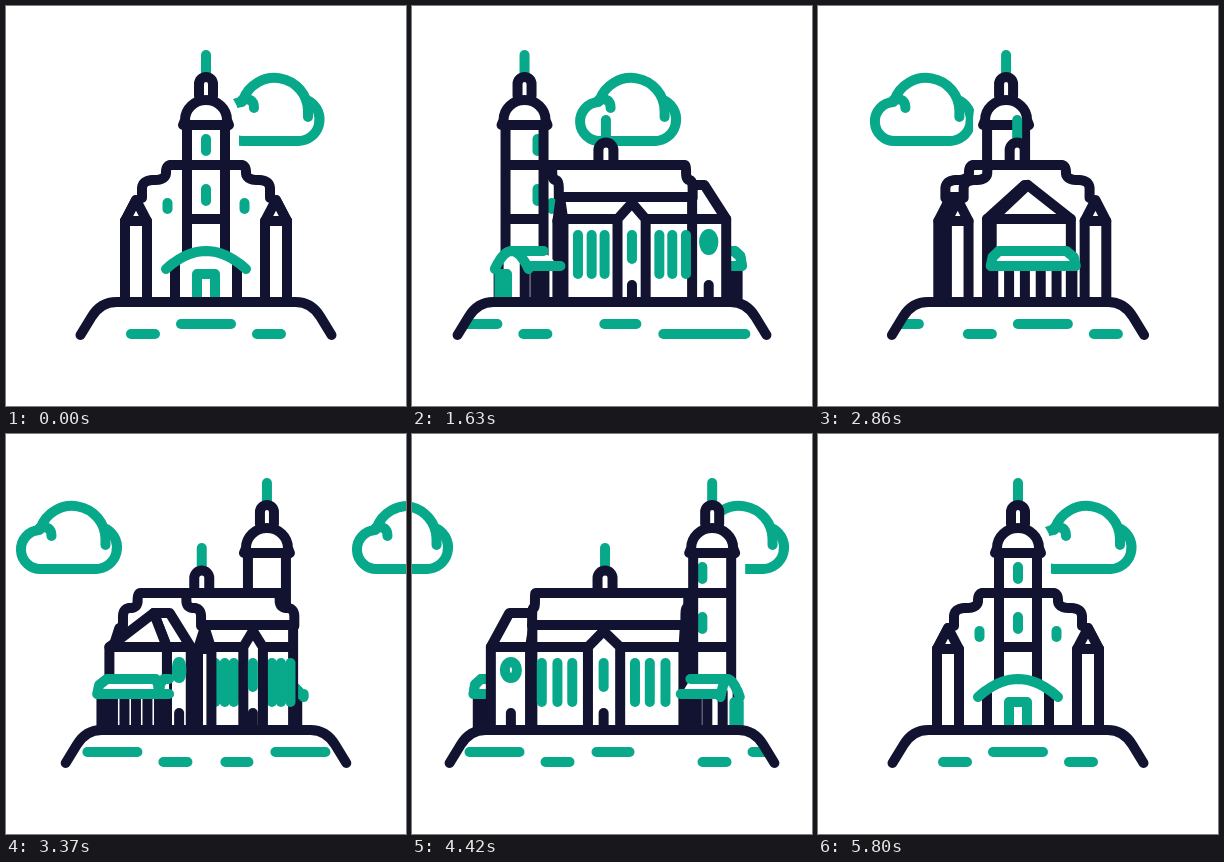
These frames come from a looping animation (400x400 px, 5860 ms). An HTML page with a canvas:

```html
<!DOCTYPE html>
<html lang="en">
<head>
<meta charset="utf-8">
<title>Turning church</title>
<style>
html, body { margin: 0; width: 100%; height: 100%; overflow: hidden; background: #fff; }
canvas { display: block; width: 100vmin; height: 100vmin; margin: 0 auto; }
</style>
</head>
<body>
<canvas id="stage"></canvas>
<script>
const NAVY = '#121331', TEAL = '#08a88a', WHITE = '#fff';
const LOOP = 5860, HOLD = 1030, STEP = 30;
const FRONT = 93, BACK = -83, TOWER = 115, GROUND = 296;

const canvas = document.getElementById('stage');
const ctx = canvas.getContext('2d');
const ratio = Math.max(1, window.devicePixelRatio || 1);
canvas.width = canvas.height = 400 * ratio;

// Elapsed ms and share of the full turn.
const turn = [[0, 0], [630, .147], [1140, .303], [1860, .478], [2400, .61],
  [2910, .7325], [3600, .857], [3900, .909], [4200, .9435], [4800, 1]];
const rates = turn.slice(1).map((k, i) => (k[1] - turn[i][1]) / (k[0] - turn[i][0]));
const slopes = turn.map((k, i) => i && i < rates.length
  ? 2 * rates[i - 1] * rates[i] / (rates[i - 1] + rates[i]) : 0);

function progress(ms) {
  if (ms >= 4800) return 1;
  let i = 0;
  while (ms > turn[i + 1][0]) i++;
  const [t0, a] = turn[i], [t1, b] = turn[i + 1];
  const h = t1 - t0, u = (ms - t0) / h, v = 1 - u;
  return a * v * v * (1 + 2 * u) + b * u * u * (3 - 2 * u)
    + h * u * v * (slopes[i] * v - slopes[i + 1] * u);
}

let sin = 0, cos = 1, wide = 1, slim = 1, side = 1;

// The building lingers slightly at its front and back views.
function aim(p) {
  const even = p * 2 * Math.PI;
  const a = even - .076 * Math.sin(2 * even) - .026 * Math.sin(4 * even);
  sin = Math.sin(a);
  cos = Math.cos(a);
  if (Math.abs(sin) < 1e-6) sin = 0;
  slim = Math.abs(cos);
  wide = cos * slim;
  side = sin >= 0 ? 1 : -1;
}

const X = (x, z) => 200 + x * wide - z * sin;

// Points are [x, z, y] in the building's own space.
function shape(pts, stroke = NAVY, fill, closed) {
  ctx.beginPath();
  pts.forEach(([x, z, y]) => ctx.lineTo(X(x, z), y));
  if (closed) ctx.closePath();
  paint(stroke, fill);
}

function paint(stroke, fill, path) {
  if (fill) {
    ctx.fillStyle = fill;
    path ? ctx.fill(path) : ctx.fill();
  }
  if (stroke) {
    ctx.strokeStyle = stroke;
    path ? ctx.stroke(path) : ctx.stroke();
  }
}

function flat(d, stroke, fill) {
  paint(stroke, fill, new Path2D(d));
}

const post = (x, z, top, bottom, color) => shape([[x, z, top], [x, z, bottom]], color);
const beam = (x, z0, z1, y, color) => shape([[x, z0, y], [x, z1, y]], color);

const cloudParts = [
  'M292 135H238A19.5 19.5 0 0 1 236 96',
  'M236 94Q248 91 248 102',
  'M237 94A33.5 33.5 0 0 1 302 105V111',
  'M303 95A21.5 21.5 0 0 1 292 135'
].map(d => new Path2D(d));

function clouds(p) {
  for (const shift of p < .5 ? [0] : [0, 336]) {
    ctx.save();
    ctx.translate(shift - 336 * p, 0);
    cloudParts.forEach(c => paint(TEAL, null, c));
    ctx.restore();
  }
  const x = X(0, TOWER);
  flat(`M${x - 33} 158V112A33 33 0 0 1 ${x + 33} 112V158Z`, null, WHITE);
}

const dashes = [
  [318, [[19, 52], [175, 225], [332, 364], [499, 555], [654, 704], [842, 892]]],
  [328, [[125, 149], [251, 275], [391, 473], [604, 628], [730, 754], [792, 815], [918, 942]]]
];

function hill(p) {
  const half = Math.hypot(125.5 * cos, 172.5 * sin);
  const l = 200 - half, r = 200 + half;
  const d = `M${l} 329L${l + 11} 311Q${l + 20} 296 ${l + 36} 296H${r - 36}`
    + `Q${r - 20} 296 ${r - 11} 311L${r} 329`;
  ctx.save();
  ctx.clip(new Path2D(d + `V334H${l}Z`));
  for (const [y, row] of dashes)
    for (const [a, b] of row)
      for (const lap of [0, 950]) {
        const x = a + lap - 950 * p;
        flat(`M${x} ${y}h${b - a}`, TEAL);
      }
  ctx.restore();
  flat(d, NAVY);
}

function tower() {
  const x = X(0, TOWER);
  flat(`M${x - 19.5} 119V296H${x + 19.5}V119Z`, null, WHITE);
  const faces = [[-20 * sin, cos], [20 * cos, sin], [-20 * cos, -sin]];
  for (const [dx, facing] of faces)
    if (facing > .7) flat(`M${x + dx} 133V145M${x + dx} 183V195`, TEAL);
  flat(`M${x - 19} 119V296M${x + 19} 119V296M${x - 19} 159H${x + 19}M${x - 19} 213H${x + 19}`, NAVY);
  flat(`M${x} 49V68`, TEAL);
  flat(`M${x - 7} 90V78A7 7 0 0 1 ${x + 7} 78V90`, NAVY, WHITE);
  flat(`M${x - 23} 119L${x - 21} 114A21 20 0 0 1 ${x + 21} 114L${x + 23} 119Z`, NAVY, WHITE);
}

function turret() {
  const x = 200 - 8 * Math.abs(sin);
  flat(`M${x} 114V132`, TEAL);
  flat(`M${x - 7.5} 158V144A7.5 7.5 0 0 1 ${x + 7.5} 144V158`, NAVY, WHITE);
}

function frontPorch() {
  const edge = 130 + 17 * Math.abs(sin) ** 8;
  const xs = [];
  for (const x of [-31, 31]) for (const z of [106, edge]) xs.push(X(x, z));
  const l = Math.min(...xs), r = Math.max(...xs);
  flat(`M${l} 250H${r}V296H${l}Z`, null, WHITE);
  for (const z of [106, 118, edge]) post(side * 31, z, 258, GROUND);
  post(side * -31, edge, 258, GROUND);
  if (cos > .2)
    shape([[-9, 143, 291], [-9, 143, 268], [9, 143, 268], [9, 143, 291]], TEAL, WHITE);
  const arc = [];
  for (let x = -40; x <= 40; x += 4) {
    const k = (x / 40) ** 2;
    arc.push([x, 132 + (edge - 132) * Math.sqrt(k), 245 + 18 * k]);
  }
  if (Math.abs(sin) > .2) {
    const top = [[0, 90, 245], [0, 132, 245], [side * 40, edge, 261], [side * 40, 90, 261]];
    shape(top, null, WHITE, true);
    beam(0, 90, 132, 245, TEAL);
    beam(side * 40, 90, edge, 260, TEAL);
  }
  shape(arc, TEAL);
}

function backPorch() {
  for (let x = -40; x <= 40; x += 16) post(x, -143, 260, GROUND);
  for (const x of [-40, 40]) post(x, -133, 260, GROUND);
  if (Math.abs(sin) > .2) {
    const x = side * 43;
    shape([[x, -128, 245], [x, -138, 245], [x, -145, 250], [x, -147, 260], [x, -128, 260]],
      TEAL, WHITE);
  }
  shape([[-43, -147, 260], [-41, -146, 251], [-34, -141, 245], [34, -141, 245],
    [41, -146, 251], [43, -147, 260]], TEAL, WHITE, true);
}

function apse() {
  const x = side * 40, top = 20 * sin;
  shape([[x, BACK, 213], [x, -128, 213], [x, -128, GROUND], [x, BACK, GROUND]], NAVY, WHITE, true);
  shape([[top, BACK, 179], [top, -113, 179], [x, -128, 213], [x, BACK, 213]], NAVY, WHITE, true);
  if (Math.abs(sin) > .25) {
    ctx.beginPath();
    ctx.ellipse(X(x, -105), 236, 8 * sin * sin, 8, 0, 0, 7);
    paint(TEAL);
    post(x, -105, 279, GROUND);
  }
  if (cos < 0) {
    shape([[-40, -128, 213], [top, -113, 179], [40, -128, 213], [40, -128, GROUND],
      [-40, -128, GROUND]], NAVY, WHITE, true);
    shape([[-40, -128, 213], [40, -128, 213]]);
  }
}

// Corner cutting turns a few corners into a soft gable outline.
function soften(pts) {
  const out = [pts[0]];
  for (let i = 1; i < pts.length; i++) {
    const [a, b] = [pts[i - 1], pts[i]];
    for (const u of [.25, .75])
      out.push([a[0] + (b[0] - a[0]) * u, a[1] + (b[1] - a[1]) * u]);
  }
  return [...out, pts[pts.length - 1]];
}

const corners = [[0, 159], [30, 159], [40, 159], [40, 174], [64, 174], [64, 192]];
const profile = soften(soften(soften(corners)));
const slope = (z, sign) => profile.map(([x, y]) => [x * sign * slim, z, y]);

function pinnacles(z) {
  for (const m of [-slim, slim]) {
    shape([[59 * m, z, 215], [81 * m, z, 215], [81 * m, z, GROUND], [59 * m, z, GROUND]],
      NAVY, WHITE, true);
    shape([[59 * m, z, 215], [70 * m, z, 194], [81 * m, z, 215]], NAVY, WHITE, true);
  }
}

function facade(z) {
  const outline = [...slope(z, -1).reverse(), ...slope(z, 1)];
  shape([[-64 * slim, z, GROUND], ...outline, [64 * slim, z, GROUND]], null, WHITE);
  shape(outline);
  if (z > 0)
    for (const x of [-38.5, 38.5]) post(x * slim, z, 197, 203, TEAL);
  pinnacles(z);
}

function sideWall(far) {
  const edge = side * 62 * slim, x = side * 60;
  shape([...slope(FRONT, side), ...slope(BACK, side).reverse()], null, WHITE);
  shape([[edge, FRONT, 191], [edge, BACK, 191], [edge, BACK, GROUND], [edge, FRONT, GROUND]],
    null, WHITE);
  shape(slope(far, side));
  post(edge, far, 191, GROUND);
  for (const z of [-64, -46, -29, 43, 60, 78]) post(x, z, 229, 268, TEAL);
  beam(0, FRONT, BACK, 159);
  beam(edge, FRONT, BACK, 191);
  beam(edge, FRONT, BACK, 213);
  shape([[x, -11, GROUND], [x, -11, 213], [x, 7, 197], [x, 26, 213], [x, 26, GROUND]],
    NAVY, WHITE);
  post(x, 7, 229, 253, TEAL);
  post(x, 7, 279, GROUND);
}

function nave() {
  const [near, far] = cos >= 0 ? [FRONT, BACK] : [BACK, FRONT];
  pinnacles(0);
  turret();
  if (Math.abs(sin) > .01) sideWall(far);
  facade(near);
}

function draw(t) {
  const ms = t < HOLD ? 0 : Math.floor((t - HOLD) / STEP + 1) * STEP;
  const p = progress(ms);
  aim(p);
  ctx.setTransform(ratio, 0, 0, ratio, 0, 0);
  ctx.fillStyle = WHITE;
  ctx.fillRect(0, 0, 400, 400);
  ctx.lineWidth = 10;
  ctx.lineCap = ctx.lineJoin = 'round';
  clouds(p);
  const order = cos >= 0
    ? [backPorch, apse, nave, tower, frontPorch]
    : [tower, frontPorch, nave, apse, backPorch];
  order.forEach(part => part());
  hill(p);
}

const start = performance.now();
function tick() {
  draw((performance.now() - start) % LOOP);
  requestAnimationFrame(tick);
}
tick();
</script>
</body>
</html>
```
